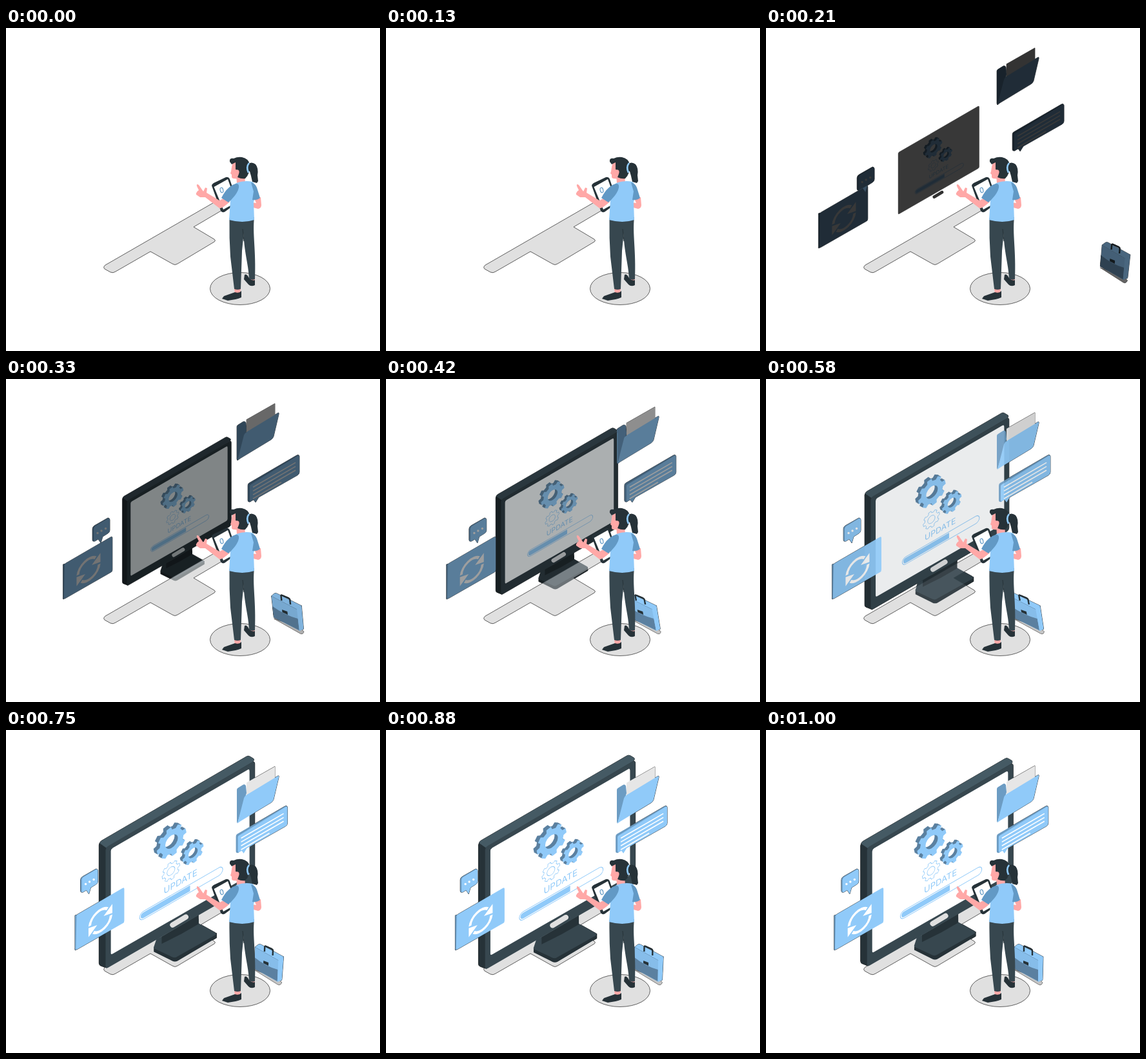
Animation, 580 px wide and 500 px high, one loop 1.04 s. Source, as an HTML page:

```html
<!DOCTYPE html>
<html lang="en">
<head>
<meta charset="utf-8">
<title>Update</title>
<style>
html, body { margin: 0; width: 100%; height: 100%; overflow: hidden; background: #fff; }
svg { display: block; width: 580px; height: 500px; }
.ink { filter: brightness(0); stroke: #000; stroke-width: .6; }
.light { fill: #90caf9; }
.mid { fill: #6c9cc3; }
.deep { fill: #5b80a0; }
.dark { fill: #263238; }
.slate { fill: #37474f; }
.skin { fill: #ffa8a7; }
.white { fill: #fff; }
.line { fill: none; stroke: #90caf9; }
.floor { fill: #e0e0e0; stroke: #222; stroke-width: .7; }
text { font: 13px Inter, Arial, sans-serif; }
</style>
</head>
<body>
<svg viewBox="0 0 580 500">
  <defs>
    <g id="shellArt">
      <path class="dark" d="M230 335V340L258 354Q262 356 266 354L325 319V312Z"/>
      <path class="slate" d="M230 333L234 321 298 290V297L323 311Q326 313 323 315L266 347Q262 350 258 348L232 336Q229 335 230 333Z"/>
      <path class="dark" d="M242 317L298 284V298L272 313 242 328Z"/>
      <path class="dark" d="M147 179Q147 176 150 174L163 184 159 365 149 361Q147 360 147 357Z"/>
      <path d="M148 176Q148 174 151 172L370 45Q373 43 376 45L381 48Q383 50 380 53L158 183Z" fill="#455a64"/>
      <path class="slate" d="M157 187Q157 183 161 180L378 54Q383 51 383 56V231Q383 235 379 238L161 364Q157 366 157 362Z"/>
    </g>
    <g id="screenArt">
      <path class="white" d="M165 188Q165 185 168 183L372 65Q375 63 375 67V221Q375 224 372 226L168 343Q165 345 165 342Z"/>
      <path d="M258.500 299.500L278.500 287.500" fill="none" stroke="#e0e0e0" stroke-width="8" stroke-linecap="round"/>
      <g id="gears"></g>
      <text class="light" stroke="none" transform="matrix(1 -.577 0 1 245 253)">UPDATE</text>
      <g transform="matrix(1 -.577 0 1 208 282.5)">
        <rect class="line" x=".5" width="126" height="12" rx="6"/>
        <path class="light" d="M77 1.700V10.300H6.500A4.300 4.300 0 0 1 6.500 1.700Z"/>
      </g>
    </g>
    <g id="refreshArt">
      <path class="mid" d="M105.500 287L109 286V339L106 341Q105 340 105.500 338Z"/>
      <path class="light" d="M108 288Q108 286 110 285L179 245Q182 243 182 246V295Q182 298 180 299L110 339Q107 341 107 338Z"/>
      <g id="arrows" transform="matrix(1 -.577 0 1 145 295)"></g>
    </g>
    <g id="bubbleArt">
      <path class="mid" d="M117 232Q117 229 120 227L141 215Q143 215 143 217L120 251Q117 252 117 249Z"/>
      <path class="light" d="M119 232Q119 230 121 228L141 216Q144 215 144 218V234Q144 237 141 239L133 244 130 254 126 248 121 251Q119 252 119 249Z"/>
      <g class="white"><circle cx="125" cy="238.500" r="1.700"/><circle cx="131" cy="235" r="1.700"/><circle cx="137.500" cy="231.500" r="1.700"/></g>
    </g>
    <g id="noteArt">
      <path class="mid" d="M358 165Q358 162 360 161L434 118Q436 117 437 118L362 190Q358 191 358 188Z"/>
      <path class="light" d="M361 166Q361 164 363 163L435 119Q438 117 438 120V144Q438 147 435 149L375 183 370 191 367 187 363 189Q361 190 361 187Z"/>
      <g id="noteLines" fill="none" stroke="#fff" stroke-width="1.600"></g>
    </g>
    <g id="folderArt">
      <path class="mid" d="M358 91Q358 89 360 88L368 83Q371 82 372 85L373 96 359 143 358 141Z"/>
      <path d="M373 80L417 55V76L373 101Z" fill="#e6e6e6"/>
      <path class="light" d="M359 143L369 104Q370 101 373 99L421 70Q424 68 423 72L415 106Q414 109 411 111L363 140Z"/>
    </g>
    <g id="caseArt">
      <path d="M385 371L423 394Q425 395 427 394L429 391 424 386Z" fill="#c4c4c4"/>
      <path d="M385 336L423 357V390L385 369Z" fill="#86bdea"/>
      <path class="deep" d="M385 352Q403 366 422 371V389L385 369Z"/>
      <path class="light" d="M422 356L430 351 429 386Q429 388 427 388L422 390Z"/>
      <path class="light" d="M385 336L390 332Q392 331 394 332L430 351 423 357Z"/>
      <path class="dark" d="M399 357L407 360V365L399 361Z"/>
      <path d="M400 343V336Q400 334 402 335L411 339Q413 340 413 342V349" fill="none" stroke="#263238" stroke-width="2.400"/>
    </g>
  </defs>

  <g id="inkLayer"></g>
  <path class="floor" d="M153 373Q150 370 154 367L326 268 342 278 291 308 323 327Q326 329 323 331L266 365Q262 368 258 365L224 346 170 377Q166 380 162 378Z"/>
  <ellipse class="floor" cx="363" cy="403.500" rx="46.500" ry="25"/>
  <g id="paintLayer"></g>

  <g id="woman">
    <path class="dark" d="M319 244Q319 242 322 240L341 231Q345 230 347 234L359 270 340 284Q336 287 333 283Z"/>
    <path class="white" d="M322.500 246L344 234 357 270 337 281Z"/>
    <ellipse cx="334.500" cy="251" rx="2.300" ry="3.800" fill="none" stroke="#6299c5" stroke-width="1.200" transform="rotate(-12 334.500 251)"/>
    <path class="skin" d="M339 263L331 267 311 255 312 248 309 247 306 253 299 243Q295 240 296 245L299 251Q294 254 295 258L301 262 309 262 331 279Q335 280 347 269Z"/>
    <path class="skin" d="M385 264L395 262 396 274Q396 279 391 280L380 277 381 270 388 271Z"/>
    <path class="skin" d="M357 225L370 226 371 241 358 241Z"/>
    <path class="skin" d="M354 402L364 402 363 412 355 413ZM377 387L386 387 385 396 378 396Z"/>
    <path class="dark" d="M355 409Q362 411 365 407V417Q361 419 356 420L344 422 338 420 335 419 338 415ZM370 382Q373 380 377 387 382 392 386 390V398Q380 401 376 397L369 389Z"/>
    <path class="slate" d="M365 299L385 293C382 318 388 345 386 389Q381 391 377 388C376 364 369 348 368 311Z"/>
    <path class="slate" d="M346.500 294L372 297Q368 320 366 345L364 404Q359 406 354 404L348 354Q346 325 346.500 294Z"/>
    <path d="M367 311L369 330" fill="none" stroke="#263238"/>
    <path class="light" d="M357 240Q370 235 382 238 387 241 387 254L384 270 385 297Q367 303 346 297L348 267 346 256Z"/>
    <path d="M380 239Q387 241 389 247L394 263Q389 267 382 266L384 253Z" fill="#6299c5"/>
    <path d="M356 241Q362 240 361 247 360 256 345 270L334 263Q343 245 356 241Z" fill="#6299c5"/>
    <path class="skin" d="M352 206Q350 214 349 222L348 225 350 227 350 231Q351 234 359 233L364 224 363 206Z"/>
    <path class="dark" d="M347 207Q346 201 353 202 359 199 366 200 376 202 378 211 379 225 371 233 365 234 359 231L361 226 360 220 356 219 356 208 350 211Z"/>
    <ellipse class="skin" cx="359" cy="223" rx="2.600" ry="3.600"/>
    <path class="dark" d="M374 211Q381 206 387 211 392 217 390 228L391 237 389 240 382 238 380 229 378 222 374 220Z"/>
    <path d="M377 209Q372 215 376 224" fill="none" stroke="#90caf9" stroke-width="2.600"/>
  </g>
</svg>
<script>
const $ = id => document.getElementById(id);
const LOOP = 1040, STEP = 41.6, STEPS = 25;

function gearPath(radius, hole, teeth = 8) {
  const outline = [];
  for (let i = 0; i < teeth; i++) {
    for (const [turn, k] of [[-.3, .8], [-.2, 1], [.2, 1], [.3, .8]]) {
      const a = (i + turn + .75) / teeth * 2 * Math.PI;
      outline.push(`${(radius * k * Math.cos(a)).toFixed(2)} ${(radius * k * Math.sin(a)).toFixed(2)}`);
    }
  }
  return `M${outline.join('L')}ZM${hole} 0A${hole} ${hole} 0 1 0 ${-hole} 0A${hole} ${hole} 0 1 0 ${hole} 0Z`;
}

function gear(x, y, radius, hole, depth) {
  const d = gearPath(radius, hole);
  const at = (k, look) =>
    `<path ${look} fill-rule="evenodd" d="${d}" transform="matrix(1 -.577 0 1 ${x - k} ${y - k * .577})"/>`;
  if (!depth) return at(0, 'class="line" stroke-width=".8"');
  let art = '';
  for (let k = depth; k > 0; k--) art += at(k, 'class="deep" stroke="none"');
  return art + at(0, 'class="light" stroke="none"');
}

$('gears').innerHTML =
  gear(257, 173.5, 22.5, 9.5, 5) + gear(289.5, 190.5, 16, 7, 4) + gear(256, 218, 13.5, 6, 0);

const arrow = `<path d="M-16.500 -1A16.500 16.500 0 0 1 11 -12" fill="none" stroke="#fff" stroke-width="4.200"/>
  <path class="white" stroke="none" d="M18.500 -15V-1L5 -4Z"/>`;
$('arrows').innerHTML = arrow + `<g transform="rotate(180)">${arrow}</g>`;

$('noteLines').innerHTML = [0, 1, 2, 3].map(i => {
  const width = i < 3 ? 66 : 44;
  return `<path d="M366 ${167.5 + i * 5.9}l${width} ${-width * .577}"/>`;
}).join('');

// Solves a cubic Bezier timing curve for progress x.
function ease(x) {
  if (x <= 0) return 0;
  if (x >= 1) return 1;
  const curve = (s, a, b) => 3 * (1 - s) ** 2 * s * a + 3 * (1 - s) * s * s * b + s ** 3;
  let low = 0, high = 1;
  for (let i = 0; i < 30; i++) {
    const s = (low + high) / 2;
    if (curve(s, .36, .5) < x) low = s; else high = s;
  }
  return curve(low, -.01, 1.38);
}

const mix = (a, b, k) => a + (b - a) * k;
const fade = k => mix(.03, 1, k);

const zoom = p => {
  const k = ease(p);
  return { alpha: fade(k), move: `translate(264.5 205) scale(${mix(.5, 1, k)}) translate(-264.5 -205)` };
};

const slide = (dx, dy) => p => {
  const k = ease(p);
  return { alpha: fade(k), move: `translate(${dx * (1 - k)} ${dy * (1 - k)})` };
};

function dash(p) {
  const stops = [[0, -20], [.6, 10], [.8, -2], [1, 0]];
  const i = p < .6 ? 0 : p < .8 ? 1 : 2;
  const [start, from] = stops[i], [end, to] = stops[i + 1];
  const k = ease((p - start) / (end - start));
  const x = i ? 0 : 272 * (1 - k);
  return {
    alpha: i ? 1 : k,
    move: `translate(${408 + x} 363) skewX(${mix(from, to, k)}) translate(-408 -363)`
  };
}

// Each part: art, motion, faintest alpha at which it shows.
const parts = [
  ['shellArt', zoom, .26],
  ['screenArt', zoom, .14],
  ['refreshArt', slide(-30, 0), .14],
  ['bubbleArt', slide(30, 0), .14],
  ['folderArt', slide(0, -30), .14],
  ['noteArt', slide(30, 0), .14],
  ['caseArt', dash, .14]
].map(([art, motion, faintest]) => {
  const copy = layer => {
    const use = document.createElementNS('http://www.w3.org/2000/svg', 'use');
    use.setAttribute('href', '#' + art);
    return $(layer).appendChild(use);
  };
  const ink = copy('inkLayer'), paint = copy('paintLayer');
  ink.setAttribute('class', 'ink');
  return { ink, paint, motion, faintest };
});

function draw(time) {
  const step = Math.min(STEPS - 1, Math.floor((time % LOOP + 5) / STEP));
  const progress = (step + .8) / STEPS;
  for (const { ink, paint, motion, faintest } of parts) {
    const { alpha, move } = motion(progress);
    for (const use of [ink, paint]) {
      use.setAttribute('transform', move);
      use.setAttribute('display', alpha < faintest ? 'none' : 'inline');
    }
    paint.setAttribute('opacity', Math.min(1, Math.max(0, alpha)));
  }
}

const origin = performance.now();
function tick() {
  draw(performance.now() - origin);
  requestAnimationFrame(tick);
}
tick();
</script>
</body>
</html>
```
